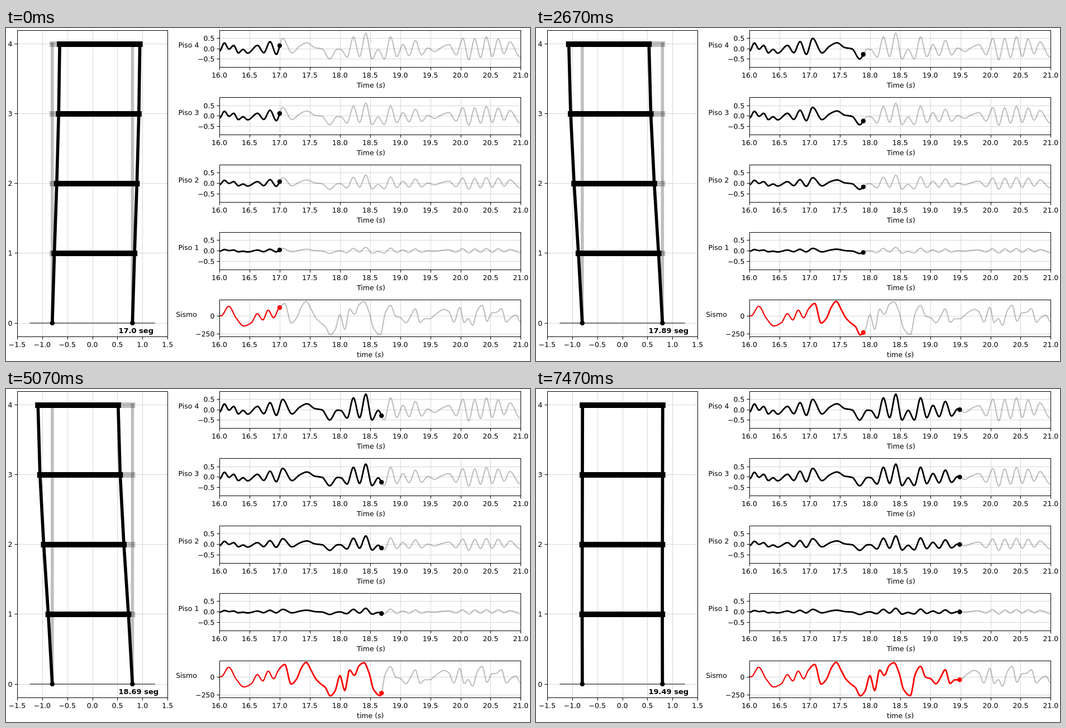
An HTML page with a canvas that plays this animation: 938x597 px, repeating every 7.5 s.

```html
<!DOCTYPE html>
<html lang="es">
<head>
<meta charset="utf-8">
<title>Respuesta sísmica</title>
<style>
  html, body { margin: 0; width: 100%; height: 100%; overflow: hidden; background: #fff; }
  canvas { display: block; }
</style>
</head>
<body>
<canvas id="c" width="938" height="597"></canvas>
<script>
const ctx = document.getElementById('c').getContext('2d');
const FAMILY = '"DejaVu Sans", sans-serif';
const LOOP = 7500, STEP = 30, DT = 0.01, T0 = 16, N = 500, FIRST = 100;
const LEFT = 382, RIGHT = 921.4, PX_S = (RIGHT - LEFT) / 5;
const GHOST = 'rgba(0,0,0,0.25)';

// A run of swings: evenly spaced turning points from a start time.
const run = (start, step, levels) => levels.map((v, i) => [start + i * step, v]);

const roofAt = spline([
  ...run(16.005, 0.0775, [-0.1, 0.28, -0.02, 0.16, -0.2, -0.03, -0.21]),
  ...run(16.633, 0.104, [0.16, -0.19, 0.34, -0.27, 0.5]),
  ...run(17.205, 0.125, [-0.2, 0.12, 0.285, 0.06, -0.01, -0.49, -0.02]),
  ...run(18.018, 0.1028, [-0.04, -0.4, 0.57, -0.38, 0.75, -0.49, -0.03, -0.49,
    0.57, -0.38, 0.21, -0.33, 0.4, -0.3, 0.04]),
  ...run(19.57, 0.12, [-0.13, 0.07, 0.2, -0.29]),
  ...run(20.041, 0.0974, [0.5, -0.53, 0.49, -0.42, 0.57, -0.37, 0.47, -0.24, 0.33]),
  [20.99, -0.4]
]);
const quakeAt = spline([
  ...run(16.03, 0.125, [5, 140, -30, -140, -95]),
  ...run(16.63, 0.09, [35, -55, 85, -25]),
  ...run(16.98, 0.105, [100, 180, -100]),
  ...run(17.28, 0.08, [-28, 130, 210, 100, -25, -95, -150, -268, -195, 20, -190,
    100, 25, 165, 205, 68, -178]),
  ...run(18.67, 0.085, [-265, 50, 152, 0, -25, -95]),
  ...run(19.17, 0.08, [-8, 105, -90, -38, -38, 10, 65, 95, 60, -85]),
  ...run(19.99, 0.07, [125, -90, -35, -130]),
  ...run(20.28, 0.08, [80, 155, -75, 45, 55, 105, -85, -20, 15, -85])
]);

// Monotone cubic through the points: flat at every extremum.
function spline(keys) {
  const last = keys.length - 1;
  const rise = i => (keys[i + 1][1] - keys[i][1]) / (keys[i + 1][0] - keys[i][0]);
  const slope = keys.map((_, i) => {
    if (i === 0 || i === last) return 0;
    const a = rise(i - 1), b = rise(i);
    return a * b <= 0 ? 0 : 2 * a * b / (a + b);
  });
  return t => {
    if (t <= keys[0][0]) return keys[0][1];
    if (t >= keys[last][0]) return keys[last][1];
    let i = 0;
    while (t > keys[i + 1][0]) i++;
    const [t0, a] = keys[i], [t1, b] = keys[i + 1];
    const h = t1 - t0, u = (t - t0) / h, v = 1 - u;
    return a * (1 + 2 * u) * v * v + b * u * u * (3 - 2 * u)
      + h * u * v * (slope[i] * v - slope[i + 1] * u);
  };
}

const times = Array.from({ length: N + 1 }, (_, i) => T0 + i * DT);
const sampleX = times.map(t => LEFT + (t - T0) * PX_S);

// Each floor follows the roof, with a small direct share of the ground motion.
const floor = (roofShare, quakeShare) =>
  times.map(t => roofShare * roofAt(t) + quakeShare * quakeAt(t));
const floors = [floor(0.2, 0.0001), floor(0.52, 0.0001), floor(0.82, 0.00005), floor(1, 0)];

const down = v => Math.floor(v) + 0.5;
const near = v => Math.round(v) + 0.5;
const fixed = v => v.toFixed(1).replace('-', '−');

function panel(i, label, labelX, xLabel, values, zero, unit, marks, color) {
  return {
    label, labelX, xLabel, color,
    top: down(4 + 120.75 * i),
    bottom: down(70.9 + 120.75 * i),
    ticks: marks.map(([s, v]) => [s, zero - v * unit]),
    ys: values.map(v => zero - v * unit)
  };
}

const floorMarks = [['0.5', 0.5], ['0.0', 0], ['−0.5', -0.5]];
const panels = [4, 3, 2, 1].map((n, i) => panel(i, 'Piso ' + n, 327, 'Time (',
  floors[n - 1], 37.2 + 120.75 * i, 37.5, floorMarks, '#000'));
const quakePanel = panel(4, 'Sismo', 323, 'time (',
  times.map(quakeAt), 516.5, 0.126, [['0', 0], ['−250', -250]], '#f00');
panels.push(quakePanel);

function text(s, x, y, align = 'center', style = '12.5px') {
  ctx.font = style + ' ' + FAMILY;
  ctx.textAlign = align;
  ctx.fillStyle = '#000';
  ctx.fillText(s, x, y);
  return ctx.measureText(s).width;
}

function line(pts, width, color, cap = 'butt') {
  ctx.lineWidth = width;
  ctx.strokeStyle = color;
  ctx.lineCap = cap;
  ctx.lineJoin = 'round';
  ctx.beginPath();
  pts.forEach(([x, y]) => ctx.lineTo(x, y));
  ctx.stroke();
}

function dot(x, y, color) {
  ctx.fillStyle = color;
  ctx.beginPath();
  ctx.arc(x, y, 4.2, 0, 2 * Math.PI);
  ctx.fill();
}

function axes(x0, x1, top, bottom, xTicks, yTicks) {
  for (const [s, x] of xTicks) {
    const px = near(x);
    line([[px, top], [px, bottom]], 1, '#d7d7d7');
    line([[px, bottom], [px, bottom + 5]], 1, '#000');
    text(s, x, bottom + 18);
  }
  for (const [s, y] of yTicks) {
    const py = down(y);
    line([[x0, py], [x1, py]], 1, '#d7d7d7');
    line([[x0 - 5, py], [x0, py]], 1, '#000');
    text(s, x0 - 9, y + 4.5, 'right');
  }
}

function frame(x0, x1, top, bottom) {
  ctx.lineWidth = 1;
  ctx.lineJoin = 'miter';
  ctx.strokeStyle = '#000';
  ctx.strokeRect(x0, top, x1 - x0, bottom - top);
}

function unitLabel(s, y) {
  let x = 628;
  x += text(s, x, y, 'left');
  x += text('s', x, y, 'left', 'italic 12.5px');
  text(')', x, y, 'left');
}

const timeTicks = Array.from({ length: 11 }, (_, i) => [fixed(T0 + i / 2), LEFT + i * PX_S / 2]);

function trace(p, from, to, width, color) {
  const pts = [];
  for (let i = from; i <= to; i++) pts.push([sampleX[i], p.ys[i]]);
  line(pts, width, color, 'square');
}

function drawPanel(p, now) {
  const x0 = near(LEFT), x1 = near(RIGHT);
  axes(x0, x1, p.top, p.bottom, timeTicks, p.ticks);
  ctx.save();
  ctx.beginPath();
  ctx.rect(x0, p.top, x1 - x0, p.bottom - p.top);
  ctx.clip();
  trace(p, 0, N, 2.1, GHOST);
  // The ground motion before the first moment stays a thinner line.
  const thick = p === quakePanel ? FIRST : 0;
  trace(p, 0, thick, 2.1, p.color);
  if (now > thick) trace(p, thick, now, 2.8, p.color);
  ctx.restore();
  frame(x0, x1, p.top, p.bottom);
  dot(sampleX[now], p.ys[now], p.color);
  text(p.label, p.labelX, (p.top + p.bottom) / 2 - 2.5);
  unitLabel(p.xLabel, p.bottom + 36.5);
}

const bx = v => 154.6 + v * 89.7;
const by = v => 529 - v * 125.1;
const meterTicks = [-1.5, -1, -0.5, 0, 0.5, 1, 1.5].map(v => [fixed(v), bx(v)]);
const levelTicks = [0, 1, 2, 3, 4].map(v => [String(v), by(v)]);

function building(shift, color) {
  for (const side of [-0.8, 0.8])
    line(shift.map((d, i) => [bx(side + d), by(i)]), 5.6, color, 'square');
  shift.slice(1).forEach((d, i) => {
    const y = Math.round(by(i + 1));
    line([[bx(d - 0.8), y], [bx(d + 0.8), y]], 10, color, 'square');
  });
}

function drawBuilding(now) {
  axes(20.5, 289.5, 4.5, 553.5, meterTicks, levelTicks);
  line([[bx(-1.25), 529], [bx(1.25), 529]], 1.1, '#000');
  building([0, 0, 0, 0, 0], GHOST);
  building([0, ...floors.map(f => f[now])], '#000');
  dot(bx(-0.8), 529, '#000');
  dot(bx(0.8), 529, '#000');
  frame(20.5, 289.5, 4.5, 553.5);
  const seconds = Number((T0 + now * DT).toFixed(2));
  const label = Number.isInteger(seconds) ? seconds.toFixed(1) : String(seconds);
  text(label + ' seg', 201.5, 547, 'left', 'bold 13px');
}

function draw(ms) {
  const now = FIRST + Math.floor((ms % LOOP) / STEP);
  ctx.fillStyle = '#fff';
  ctx.fillRect(0, 0, 938, 597);
  drawBuilding(now);
  panels.forEach(p => drawPanel(p, now));
}

const start = performance.now();
function tick() {
  draw(performance.now() - start);
  requestAnimationFrame(tick);
}
tick();
</script>
</body>
</html>
```
